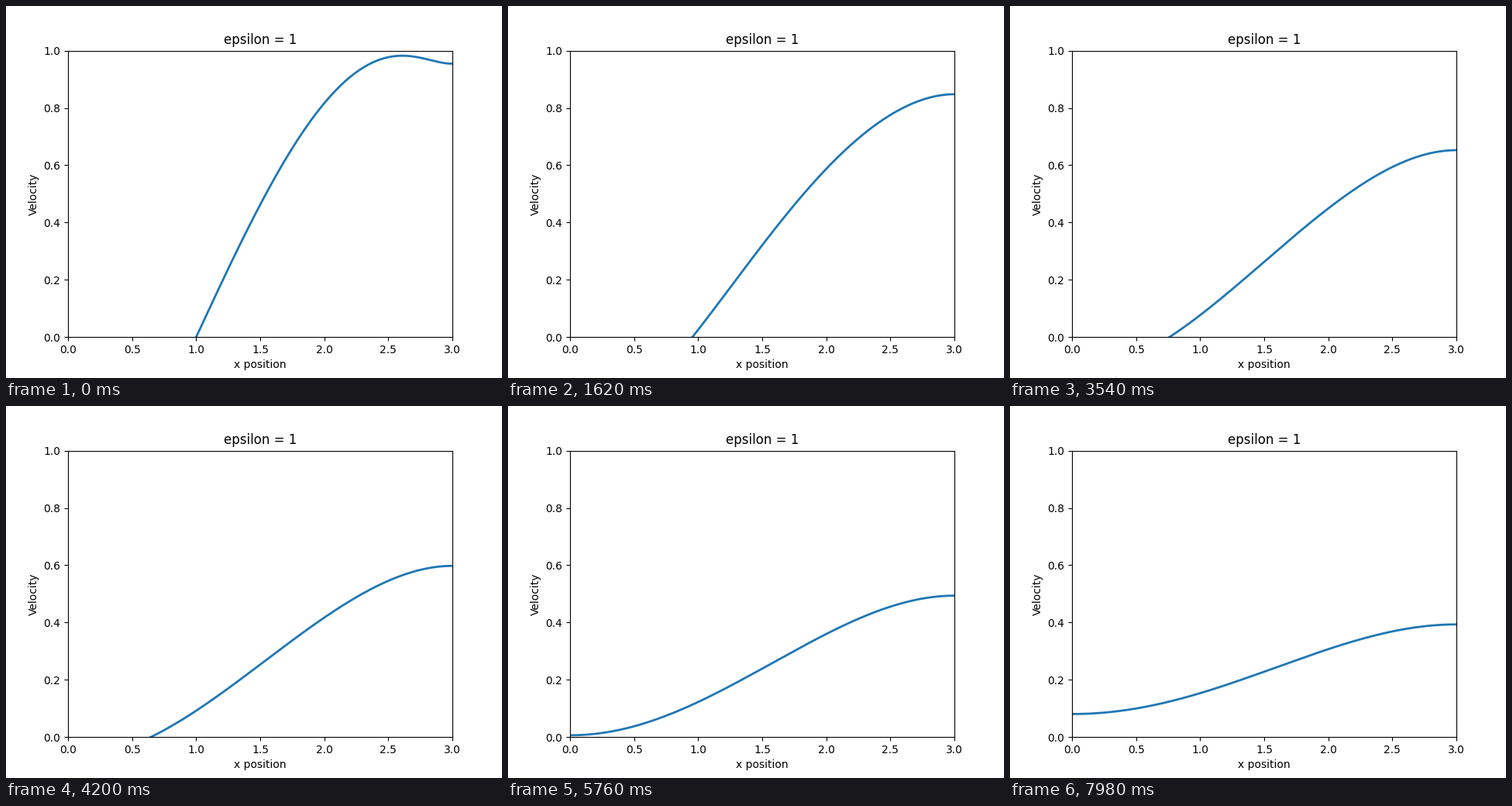
Recreate the animation shown at these times as a matplotlib script. Size 640 px wide and 480 px high, loop 8000 ms.

```python
import numpy as np
import matplotlib.pyplot as plt
from matplotlib.animation import FuncAnimation

EPS = 1        # viscosity
LENGTH = 3.0
CELLS = 240
DT = 0.01      # solver step
STEP_MS = 60   # time one solver step stays on screen
TICK_MS = 20
LOOP_MS = 8000
LEAD = 2       # solver steps taken before the first picture

h = LENGTH / CELLS
x = np.linspace(0, LENGTH, CELLS + 1)


def derivative_matrices():
    """Central differences with zero slope at both walls."""
    ones = np.ones(CELLS)
    up, down = np.diag(ones, 1), np.diag(ones, -1)
    grad = (up - down) / (2 * h)
    grad[0] = grad[-1] = 0
    lap = (up + down - 2 * np.eye(CELLS + 1)) / h**2
    lap[0, 1] *= 2
    lap[-1, -2] *= 2
    return grad, lap


def solve(steps):
    """Viscous Burgers equation, backward Euler in time."""
    grad, lap = derivative_matrices()
    base = np.eye(CELLS + 1) - DT * EPS * lap
    states = [np.sin(x - 1)]
    for _ in range(steps):
        u = states[-1]
        for _ in range(3):
            u = np.linalg.solve(base + DT * u[:, None] * grad, states[-1])
        states.append(u)
    return states


states = solve(LEAD + LOOP_MS // STEP_MS)

fig, ax = plt.subplots(figsize=(6.4, 4.8), dpi=100)
ax.set(xlim=(0, LENGTH), ylim=(0, 1), xlabel="x position",
       ylabel="Velocity", title=f"epsilon = {EPS}")
line, = ax.plot(x, states[LEAD], lw=2)


def update(i):
    line.set_ydata(states[LEAD + i * TICK_MS // STEP_MS])
    return line,


anim = FuncAnimation(fig, update, frames=LOOP_MS // TICK_MS,
                     interval=TICK_MS, repeat=True, repeat_delay=0)
plt.show()
```
